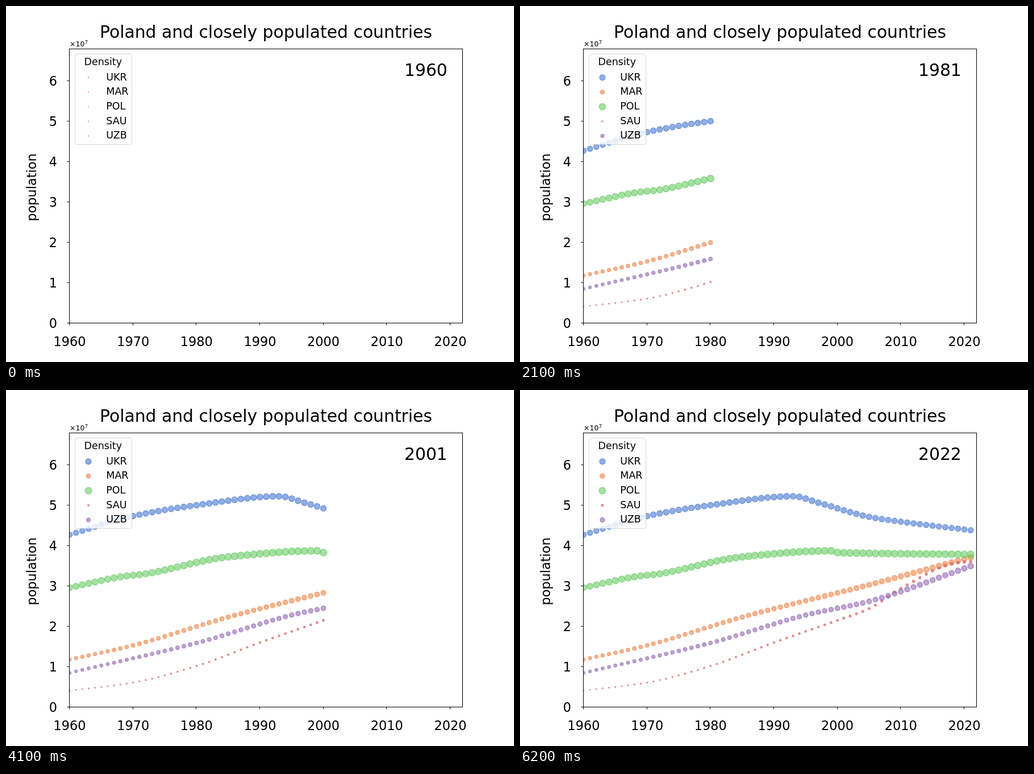
Animation, 894 px wide and 626 px high, one loop 6.3 s. Source, as an HTML page:

```html
<!DOCTYPE html>
<html lang="en">
<head>
<meta charset="utf-8">
<title>Poland and closely populated countries</title>
<style>
  html, body { margin: 0; width: 100%; height: 100%; overflow: hidden; background: #fff; }
  svg { display: block; width: 894px; height: 626px; font-family: "DejaVu Sans", sans-serif; }
  text { fill: #000; }
  .dot { fill-opacity: .6; stroke-opacity: .6; stroke-width: 1.6; }
  .mid { text-anchor: middle; }
  .end { text-anchor: end; }
</style>
</head>
<body>
<svg viewBox="0 0 894 626">
  <clipPath id="area"><rect x="111.5" y="75.5" width="692" height="482"/></clipPath>
  <g id="plot" clip-path="url(#area)"></g>
  <g id="axes" stroke="#000" fill="none">
    <rect x="111.5" y="75.5" width="692" height="482"/>
  </g>
  <g id="ticks" font-size="22.4"></g>
  <text class="mid" x="457.5" y="56" font-size="29.8">Poland and closely populated countries</text>
  <text class="mid" transform="translate(52.5 319) rotate(-90)" font-size="22.4">population</text>
  <text x="112" y="71" font-size="12.5">×10<tspan dy="-4.5" font-size="8.75">7</tspan></text>
  <text id="year" class="mid" x="738.9" y="123" font-size="29.8">1960</text>
  <g id="legend" font-size="17.5">
    <rect x="121.5" y="84.5" width="100" height="159" rx="3.5" fill="#fff" fill-opacity=".8" stroke="#ccc" stroke-opacity=".8"/>
    <text class="mid" x="170.8" y="104">Density</text>
  </g>
</svg>
<script>
const STEP = 100, YEARS = 62;
const X0 = 112, DX = 11.165, Y0 = 557.8, DY = 7.106;
const DOT = 1.09; // pixels per unit of dot size

// area in thousand km²; turning points as [years after 1960, millions]
const series = [
  { name: 'UKR', color: '#4878d0', area: 579,
    points: [[0, 42.7], [10, 47.3], [20, 50], [33, 52.2], [37, 50.6], [45, 47.1], [50, 45.9], [61, 43.8]] },
  { name: 'MAR', color: '#ee854a', area: 446,
    points: [[0, 11.8], [10, 15.3], [25, 22.3], [45, 30.3], [61, 37.1]] },
  { name: 'POL', color: '#6acc64', area: 306,
    points: [[0, 29.6], [9, 32.5], [11, 32.8], [25, 37.2], [39, 38.7], [40, 38.25], [61, 37.8]] },
  { name: 'SAU', color: '#d65f5f', area: 2150,
    points: [[0, 4.1], [10, 6.1], [20, 10.2], [30, 16], [40, 21.5], [45, 24.4], [50, 29.4], [59, 35.8], [61, 36]] },
  { name: 'UZB', color: '#956cb4', area: 428,
    points: [[0, 8.5], [20, 15.9], [35, 22.8], [45, 26.2], [61, 34.9]] }
];

const $ = id => document.getElementById(id);

function add(parent, tag, attrs, text) {
  const el = document.createElementNS('http://www.w3.org/2000/svg', tag);
  for (const key in attrs) el.setAttribute(key, attrs[key]);
  if (text !== undefined) el.textContent = text;
  return parent.appendChild(el);
}

// monotone cubic through the given points
function curve(points) {
  const last = points.length - 1;
  const rate = i => (points[i + 1][1] - points[i][1]) / (points[i + 1][0] - points[i][0]);
  const slope = i => {
    if (i === 0) return rate(0);
    if (i === last) return rate(last - 1);
    const a = rate(i - 1), b = rate(i);
    return a * b > 0 ? 2 * a * b / (a + b) : 0;
  };
  return x => {
    let i = 0;
    while (i < last - 1 && x > points[i + 1][0]) i++;
    const [[x1, y1], [x2, y2]] = points.slice(i, i + 2);
    const h = x2 - x1, u = (x - x1) / h, v = 1 - u;
    return v * v * ((1 + 2 * u) * y1 + u * h * slope(i)) +
           u * u * ((1 + 2 * v) * y2 - v * h * slope(i + 1));
  };
}

const radius = density => DOT * Math.sqrt(density) / 2;
const dot = (parent, color, cx, cy, r) =>
  add(parent, 'circle', { class: 'dot', fill: color, stroke: color, cx, cy, r });

for (let i = 0; i <= 6; i++) {
  const x = Math.floor(X0 + i * 10 * DX - .5) + .5;
  const y = Math.floor(Y0 - i * 10 * DY) + .5;
  add($('axes'), 'path', { d: `M${x} 558v3.5M111 ${y}h-3.5` });
  add($('ticks'), 'text', { class: 'mid', x: X0 + i * 10 * DX, y: 598 }, 1960 + i * 10);
  add($('ticks'), 'text', { class: 'end', x: 90, y: y + 8 }, i);
}

series.forEach((s, row) => {
  const population = curve(s.points);
  s.density = [];
  s.dots = [];
  for (let i = 0; i < YEARS; i++) {
    const pop = population(i), density = pop / s.area * 1000;
    s.density.push(density);
    s.dots.push(dot($('plot'), s.color, X0 + i * DX, Y0 - pop * DY, radius(density)));
  }
  const y = 125.7 + row * 25.7;
  s.key = dot($('legend'), s.color, 145, y, 0);
  s.tiny = add($('legend'), 'circle', { fill: s.color, 'fill-opacity': .8, cx: 145, cy: y, r: 1.1 });
  add($('legend'), 'text', { x: 176.3, y: y + 4.8 }, s.name);
});

let shown = -1;
function show(count) {
  if (count === shown) return;
  shown = count;
  $('year').textContent = 1960 + count;
  for (const s of series) {
    s.dots.forEach((d, i) => d.setAttribute('visibility', i < count ? 'visible' : 'hidden'));
    s.tiny.setAttribute('visibility', count ? 'hidden' : 'visible');
    // the key shows the middle of the size range so far
    const sizes = s.density.slice(0, count);
    const mean = count ? (Math.min(...sizes) + Math.max(...sizes)) / 2 : 0;
    s.key.setAttribute('r', radius(mean));
  }
}

const start = performance.now();
function tick() {
  show(Math.floor((performance.now() - start) / STEP) % (YEARS + 1));
  requestAnimationFrame(tick);
}
show(0);
requestAnimationFrame(tick);
</script>
</body>
</html>
```
